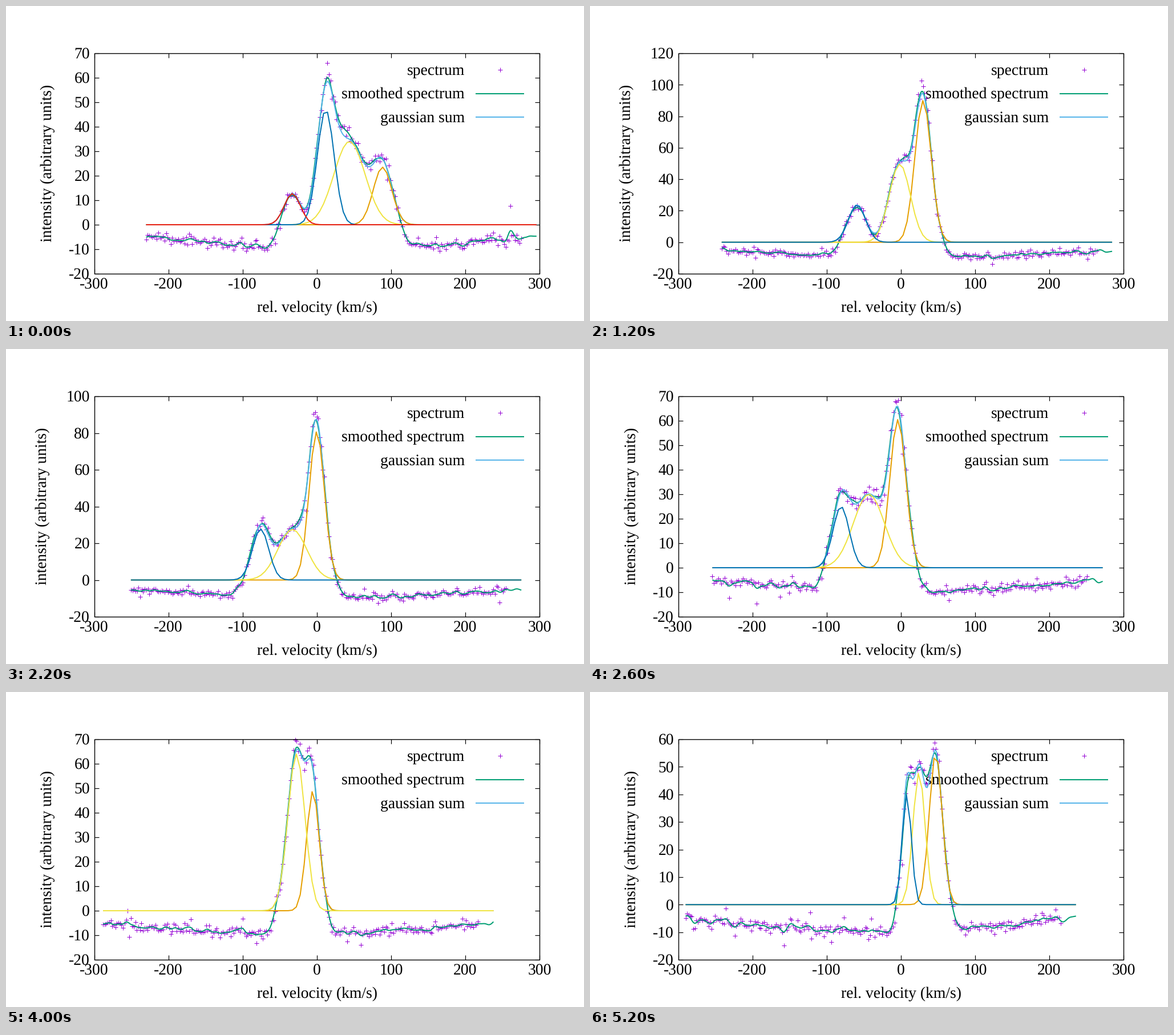
Write a matplotlib script that moves like this. It is 1013 px wide and 553 px high and loops after 5.4 s.

```python
import numpy as np
import matplotlib.pyplot as plt
from matplotlib.animation import FuncAnimation

W, H, DPI = 1013, 553, 100
FRAMES, STEP_MS = 27, 200
PT = 72 / DPI
LEFT, RIGHT, TOP, BOTTOM = 154.5, 935, 83, 470
FLOOR = -20
SPAN, SEEN = 526, 507  # km/s covered by the curves and by the points

PURPLE, GREEN, SKY = "#9400D3", "#009E73", "#56B4E9"
FIT_COLORS = ["#E69F00", "#F0E442", "#0072B2", "#E51E10"]

# Gas clouds drift between key poses: (time, height, velocity, width)
CLOUDS = [
    [(0, 23.5, 88.5, 12.5), (3, 0, 78, 12)],
    [(0, 34, 44, 21), (4, 59, 49, 12.2), (6, 90, 30, 11), (9, 101, 3.8, 9.8),
     (13, 60.5, -4, 10.8), (17, 53, -7.5, 8.7), (20, 49, -5.3, 8.5),
     (22, 72, 2, 9), (26, 55, 47, 8.7)],
    [(0, 47, 12, 11.3), (4, 66, 13, 11.7), (9, 25, -23, 18), (13, 30, -43, 21),
     (17, 53, -51.5, 15.5), (20, 64, -27.5, 11.5), (26, 48, 24.5, 8.2)],
    [(0, 12.7, -33, 11), (4, 19, -51, 12), (9, 30.5, -71, 11),
     (13, 25, -80.5, 11), (17, 8, -92, 9), (20, 0, -60, 8), (23, 0, 2, 6),
     (26, 40, 8, 6.2)],
]
WINDOW = [(0, -230), (9, -247), (13, -254), (20, -288), (26, -290)]
WEAKEST_FIT = 10


def pose(i, keys):
    t, *values = zip(*keys)
    return [np.interp(i, t, v) for v in values]


def bell(v, height, mid, width):
    return height * np.exp(-((v - mid) / width) ** 2 / 2)


def total(v, clouds):
    return sum(bell(v, *c) for c in clouds)


def spectrum(i, v, start, clouds):
    """Noisy data: lines on a base level that sags towards the middle."""
    rng = np.random.default_rng(100 + i)
    line = 1.03 * total(v, clouds)
    base = -5 - 4.5 * np.sin(np.pi * (v - start) / SPAN)
    noise = rng.standard_t(4, len(v)) * (1 + 0.015 * line)
    return line + base * np.exp(-line / 3) + noise


def smooth(v, y, at, width=3.4):
    k = np.exp(-((at[:, None] - v) / width) ** 2 / 2)
    return k @ y / k.sum(axis=1)


def scale_for(peak):
    high = 1.06 * peak
    step = 20 if high + 10 > 100 else 10
    return int(np.ceil(high / step)) * step, step


def px(v):
    return LEFT + (np.asarray(v) + 300) / 600 * (RIGHT - LEFT)


plt.rcParams.update({"font.family": "Liberation Serif", "font.size": 27.6 * PT,
                     "text.hinting": "none"})

fig = plt.figure(figsize=(W / DPI, H / DPI), dpi=DPI, facecolor="white")
ax = fig.add_axes([0, 0, 1, 1])
ax.set_xlim(0, W)
ax.set_ylim(H, 0)
ax.axis("off")


def line(color, width=2, z=3):
    return ax.plot([], [], color=color, lw=width * PT, zorder=z,
                   solid_joinstyle="round", solid_capstyle="butt")[0]


def label(x, y, s="", ha="center", **kw):
    return ax.text(x, y, s, ha=ha, va="baseline", color="black", zorder=1, **kw)


def plus(x, y):
    return ax.plot(x, y, ls="", marker="+", ms=8 * PT, mew=PT,
                   color=PURPLE, zorder=2)[0]


# Frame, velocity axis and key
line("black", 1.4, 9).set_data([LEFT, RIGHT, RIGHT, LEFT, LEFT],
                               [TOP, TOP, BOTTOM, BOTTOM, TOP])
for v in range(-300, 301, 100):
    label(px(v), 496, str(v))
    for y0, y1 in ((BOTTOM, BOTTOM - 8), (TOP, TOP + 8)):
        line("black", 1.2, 1).set_data([px(v)] * 2, [y0, y1])
label(545, 536.5, "rel. velocity (km/s)")

for k, name in enumerate(("spectrum", "smoothed spectrum", "gaussian sum")):
    label(804, 121 + 41.5 * k, name, "right")
plus([865.5], [112])
line(GREEN).set_data([823, 908], [154, 154])
line(SKY).set_data([823, 908], [195, 195])

# Parts that change
y_title = label(79.5, 276, "intensity (arbitrary units)", rotation=90,
                rotation_mode="anchor")
y_names = [label(147, 0, ha="right") for _ in range(12)]
y_ticks = line("black", 1.2, 1)
dots = plus([], [])
green, sky = line(GREEN, z=3), line(SKY, z=4)
fits = [line(c, z=5 + k) for k, c in enumerate(FIT_COLORS)]


def draw(i):
    start = pose(i, WINDOW)[0]
    clouds = [pose(i, keys) for keys in CLOUDS]
    # Colours go from the fastest fitted cloud to the slowest
    fitted = sorted((c for c in clouds if c[0] > WEAKEST_FIT), key=lambda c: -c[1])

    v = start + np.arange(0, SPAN + 1, 2.07)
    y = spectrum(i, v, start, clouds)
    fine = np.linspace(start, start + SPAN, 300)
    coarse = np.linspace(start, start + SPAN, 100)
    model = total(fine, fitted)
    top, step = scale_for(model.max())

    def py(val):
        return BOTTOM - (np.asarray(val) - FLOOR) / (top - FLOOR) * (BOTTOM - TOP)

    shown = (v <= start + SEEN) & (y <= top) & (y >= FLOOR)
    dots.set_data(px(v[shown]), py(y[shown]))
    green.set_data(px(fine), py(smooth(v, y, fine)))
    sky.set_data(px(fine), py(model))
    for k, fit in enumerate(fits):
        fit.set_visible(k < len(fitted))
        if k < len(fitted):
            fit.set_data(px(coarse), py(bell(coarse, *fitted[k])))

    marks = list(range(FLOOR, top + 1, step))
    xs, ys = [], []
    for k, name in enumerate(y_names):
        name.set_text(str(marks[k]) if k < len(marks) else "")
        if k < len(marks):
            at = float(py(marks[k]))
            name.set_y(at + 9)
            xs += [LEFT, LEFT + 8, np.nan, RIGHT - 8, RIGHT, np.nan]
            ys += [at, at, np.nan, at, at, np.nan]
    y_ticks.set_data(xs, ys)
    y_title.set_x(71 if top >= 100 else 79.5)
    return [dots, green, sky, y_ticks, y_title, *fits, *y_names]


anim = FuncAnimation(fig, draw, frames=FRAMES, interval=STEP_MS,
                     init_func=lambda: draw(0), repeat=True, repeat_delay=0)
plt.show()
```
